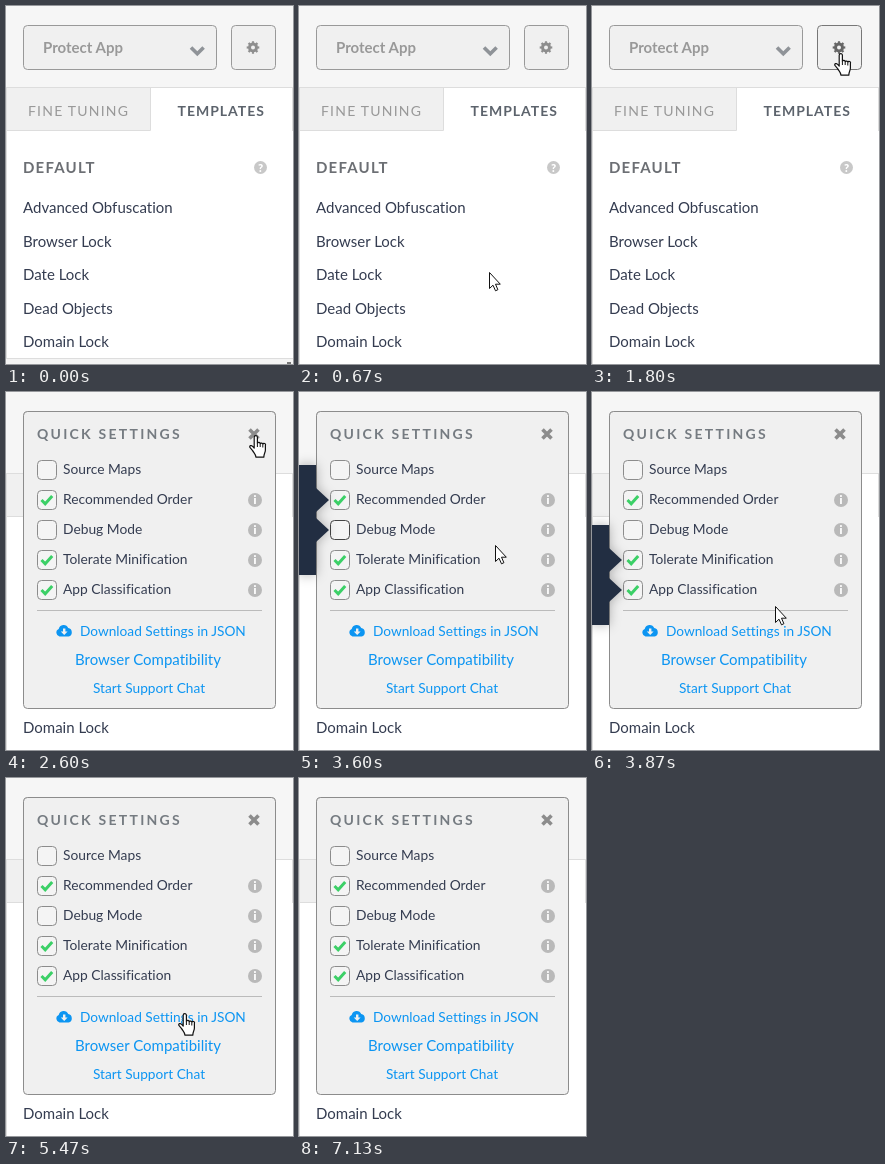
Recreate the animation shown at these times as an HTML page. Size 287 by 358 pixels, loop 7470 ms.

```html
<!DOCTYPE html>
<html lang="en">
<head>
<meta charset="utf-8">
<title>Quick settings</title>
<style>
  html, body { margin: 0; width: 100%; height: 100%; overflow: hidden; background: #fff; }
  svg { display: block; width: 100%; height: 100%; font: 15px Lato, sans-serif; font-variant-ligatures: none; }
  .item { fill: #343c50; }
  .label { font-size: 13.8px; fill: #343c50; }
  .tab { font-size: 14px; }
  .bold { font-weight: 700; }
  .link { fill: #0c95f2; }
  .small { font-size: 13.7px; }
  .pressed { fill: #0869b0; }
  .box { fill: #f0f0f0; stroke: #999; }
  .badge { font-size: 11px; font-weight: 900; fill: #fff; text-anchor: middle; }
  .line { fill: none; stroke: #ddd; }
  .gear { fill: none; stroke: #8e8e8e; }
  .hover .box { stroke: #777; }
  .hover .gear { stroke: #666; }
  .check { fill: none; stroke: #3cd067; stroke-width: 3; }
  #tips { fill: #222e42; filter: drop-shadow(0 0 6px rgba(0, 0, 0, .3)); }
</style>
</head>
<body>
<svg viewBox="0 0 287 358" preserveAspectRatio="none">
  <rect width="287" height="82" fill="#f6f6f6"/>
  <rect class="box" x="17.5" y="19.5" width="193" height="44" rx="4"/>
  <text class="bold" x="37" y="47" fill="#999">Protect App</text>
  <path d="M185 41.5l6.3 6.3 6.3-6.3" fill="none" stroke="#8f9398" stroke-width="3.6"/>
  <g id="gearButton">
    <rect class="box" x="225.5" y="19.5" width="44" height="44" rx="4"/>
    <circle class="gear" cx="247" cy="41.5" r="3.5" stroke-width="3"/>
    <circle class="gear" cx="247" cy="41.5" r="5.2" stroke-width="2.2" pathLength="16" stroke-dasharray="1" stroke-dashoffset=".5"/>
  </g>

  <rect y="82" width="144" height="43" fill="#f0f0f0"/>
  <path class="line" d="M0 81.5H287M144.5 82V124.5H0M.5 82V358M286.5 82V125"/>
  <text class="tab" x="22" y="110" fill="#999" letter-spacing="1.2">FINE TUNING</text>
  <text class="tab bold" x="171.5" y="110" fill="#5c636c" letter-spacing="1">TEMPLATES</text>
  <text class="bold" x="17" y="167" fill="#6c6f74" letter-spacing="1.2">DEFAULT</text>
  <circle cx="254.5" cy="161.5" r="6.5" fill="#c8c8c8"/>
  <text class="badge" x="254.5" y="165.5">?</text>
  <g id="templates"></g>

  <g id="bottomBar">
    <rect y="352" width="287" height="8" fill="#f4f4f4"/>
    <path class="line" d="M0 352.5H287"/>
    <rect x="281" y="356" width="4" height="2" fill="#777"/>
  </g>

  <g id="panel">
    <rect x="17.5" y="19.5" width="252" height="297" rx="4" fill="#f0f0f0" stroke="#8c8c8c"/>
    <text class="tab bold" x="31" y="47" fill="#757b81" letter-spacing="2.25">QUICK SETTINGS</text>
    <path d="M243.5 37.5l9 9m0-9l-9 9" stroke="#8c8c8c" stroke-width="3.6"/>
    <g id="options"></g>
    <path d="M31 218.5H256" stroke="#bbb"/>
    <g id="download" class="link small">
      <g transform="translate(0 -1)">
        <path d="M53.5 245.5a3.9 3.9 0 0 1-.8-7.4 5 5 0 0 1 9.5-1 4.3 4.3 0 0 1 .4 8.4z"/>
        <path d="M57 237.5h2.4v3h2.2l-3.4 3.4-3.4-3.4H57z" fill="#f0f0f0"/>
      </g>
      <text x="74" y="244">Download Settings in JSON</text>
    </g>
    <text class="link" x="69" y="273">Browser Compatibility</text>
    <text class="link small" x="87" y="301">Start Support Chat</text>
    <g id="tips"></g>
  </g>

  <g id="cursor" fill="#fff" stroke="#111" stroke-linejoin="round">
    <path id="arrow" d="M.5 .5V16.5L4 13.2 6.5 18.8 8.9 17.7 6.5 12.2H11.3Z"/>
    <g id="hand" transform="translate(-6)">
      <path d="M5.2 13V2.2a1.6 1.6 0 0 1 3.2 0V8.2a1.5 1.5 0 0 1 2.8.4 1.5 1.5 0 0 1 2.6.6 1.4 1.4 0 0 1 2.6 1.2V15c0 2.6-1.6 3.6-1.6 7.2H7c0-2.5-2-4.2-3.4-6.6L.9 12.4c-.8-1.7 1.4-2.5 2.5-1.2z" stroke-width="1.2"/>
      <path d="M8.4 8.2V12M11.2 8.8V12M13.8 9.4V12.5" stroke-width="1"/>
    </g>
  </g>
</svg>
<script>
const LOOP = 7470, FRAME = 1000 / 15;
const OPEN = 39, PRESS = 78, RELEASE = 82;
const $ = id => document.getElementById(id);
const show = (node, on) => node.style.display = on ? '' : 'none';

$('templates').innerHTML =
  ['Advanced Obfuscation', 'Browser Lock', 'Date Lock', 'Dead Objects', 'Domain Lock']
    .map((name, i) => `<text class="item" x="17" y="${Math.round(207 + i * 33.5)}">${name}</text>`).join('');

const options = [
  ['Source Maps', false], ['Recommended Order', true], ['Debug Mode', false],
  ['Tolerate Minification', true], ['App Classification', true]
];
const rowY = i => 78 + i * 30;
$('options').innerHTML = options.map(([name, checked], i) => {
  const y = rowY(i);
  return `<rect x="31.5" y="${y - 9.5}" width="19" height="19" rx="4" fill="#f4f4f4" stroke="#8c8c8c"/>
    ${checked ? `<path class="check" d="M35.5 ${y}l3.7 3.8 7-7.8"/>` : ''}
    <text class="label" x="57" y="${y + 4}">${name}</text>
    ${i ? `<circle cx="249" cy="${y}" r="7" fill="#b9b9b9"/><text class="badge" x="249" y="${y + 4}">i</text>` : ''}`;
}).join('');
const debugBox = document.querySelectorAll('#options rect')[2];

// Tooltips reach in from the left: option row, first and last frame, top and bottom.
const tips = [
  [1, 52, 55, 73, 143], [2, 53, 56, 93, 183], [3, 55, 58, 133, 203], [4, 57, 60, 163, 233]
];
$('tips').innerHTML = tips.map(([row, , , top, bottom]) =>
  `<path d="M0 ${top}H17V${rowY(row) - 12}l13 12-13 12V${bottom}H0z"/>`).join('');

// Pointer waypoints: frame, x, y, ease-out power of the way there.
const route = [
  [6, 130, 360, 1], [13, 235, 195, 1], [18, 222, 157, 1.7], [28, 249, 43, 1.5], [49, 249, 43, 1],
  [54, 196, 153, 1], [61, 178, 235, 1.6], [104, 178, 235, 1], [107, 47, 400, 1]
];
function pointerAt(frame) {
  const next = route.findIndex(p => p[0] >= frame);
  if (next < 1) return route.at(next).slice(1, 3);
  const [f0, x0, y0] = route[next - 1], [f1, x1, y1, power] = route[next];
  const k = 1 - (1 - (frame - f0) / (f1 - f0)) ** power;
  return [x0 + (x1 - x0) * k, y0 + (y1 - y0) * k];
}

function render(time) {
  const frame = Math.floor((time % LOOP + 4) / FRAME);
  const open = frame >= OPEN;
  const [x, y] = pointerAt(frame).map(Math.round);
  const within = (top, bottom) => y >= top && y <= bottom;
  const hand = within(0, 62) || open && (within(231, 248) || within(261, 278));

  show($('bottomBar'), frame < 3);
  $('bottomBar').setAttribute('transform', `translate(0 ${frame * 2})`);
  show($('panel'), open);
  $('gearButton').classList.toggle('hover', hand && !open);
  $('download').classList.toggle('pressed', frame >= PRESS && frame < RELEASE);
  tips.forEach(([, first, last], i) => show($('tips').children[i], frame >= first && frame <= last));
  debugBox.setAttribute('stroke', frame >= 53 && frame <= 54 ? '#444' : '#8c8c8c');
  $('cursor').setAttribute('transform', `translate(${x} ${y})`);
  show($('hand'), hand);
  show($('arrow'), !hand);
}

const start = performance.now();
function tick() {
  render(performance.now() - start);
  requestAnimationFrame(tick);
}
tick();
</script>
</body>
</html>
```
